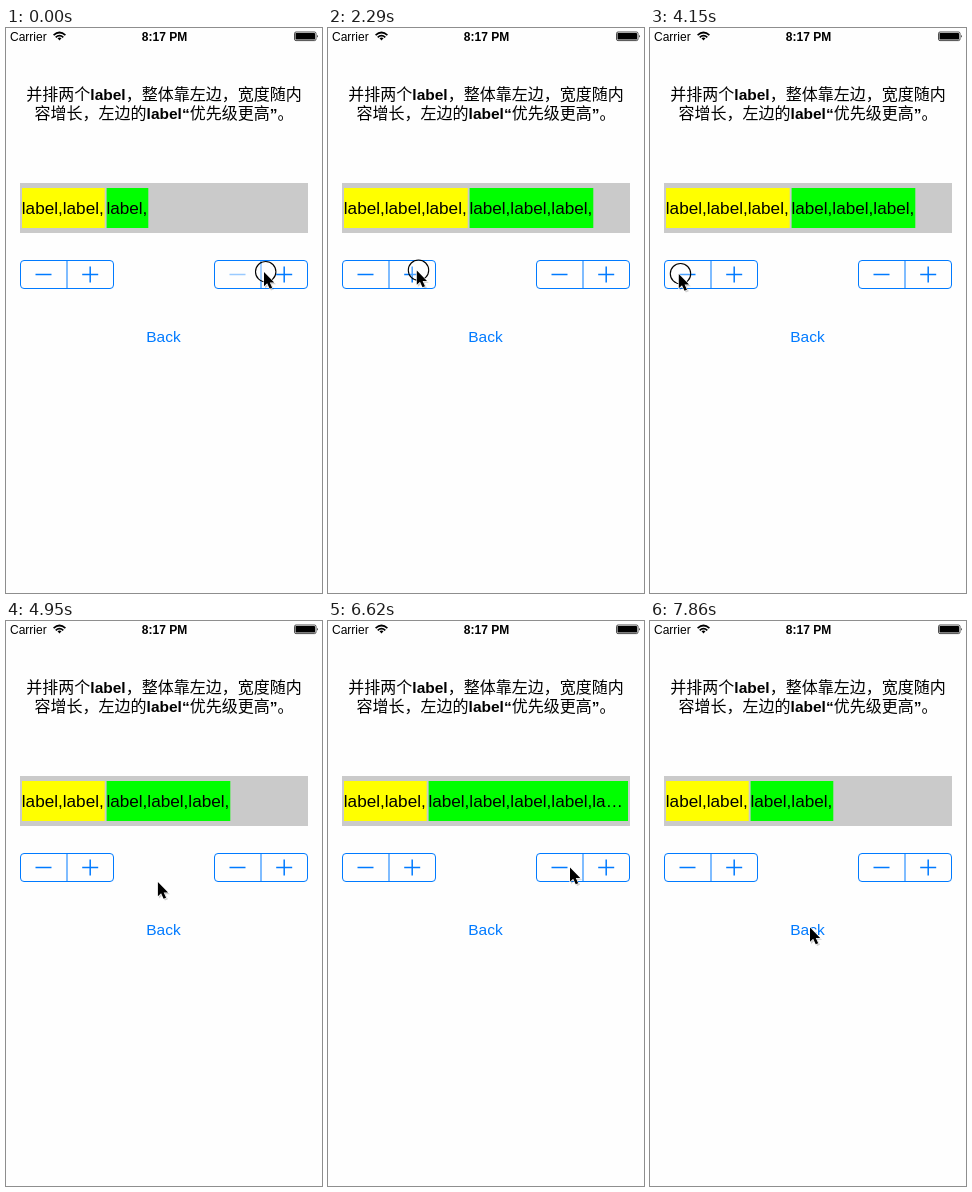
These frames come from a looping animation (316x565 px, 8000 ms). An HTML page:

```html
<!DOCTYPE html>
<html lang="zh">
<head>
<meta charset="utf-8">
<title>Two labels</title>
<style>
  html, body { margin: 0; width: 100%; height: 100%; overflow: hidden; background: #fefefe; }
  svg { display: block; width: 100vw; height: 100vh; }
  text { font-family: "Liberation Sans", Arial, sans-serif; white-space: pre; }
  .title { font: 500 16px "Noto Sans CJK SC", "Noto Sans CJK", sans-serif; text-anchor: middle; }
  .title tspan { font: bold 15.5px "Liberation Sans", Arial, sans-serif; }
  .status { font-size: 12px; }
  .label { font-size: 17.15px; }
  .line { fill: none; stroke: #007aff; }
</style>
</head>
<body>
<svg viewBox="0 0 316 565">
  <rect width="316" height="565" fill="#fefefe"/>

  <text class="status" x="4" y="12.5">Carrier</text>
  <g fill="none" stroke="#000" stroke-width="1.7">
    <path d="M47.6 7.2Q53.5 1.8 59.4 7.2M49.7 9.3Q53.5 5.8 57.3 9.3"/>
    <path d="M51.5 10.3Q53.5 8.6 55.5 10.3L53.5 12.6Z" fill="#000" stroke="none"/>
  </g>
  <text class="status" x="158.5" y="12.5" font-weight="bold" text-anchor="middle">8:17 PM</text>
  <rect x="288.5" y="4" width="21.5" height="8.6" rx="1.5" fill="none" stroke="#000" stroke-width=".7"/>
  <rect x="289.5" y="5" width="19.5" height="6.6" rx=".6"/>
  <path d="M311 6.8q1.6 1.5 0 3z"/>

  <text class="title" x="158" y="72">并排两个<tspan>label</tspan>，整体靠左边，宽度随内</text>
  <text class="title" x="158" y="91">容增长，左边的<tspan>label“</tspan>优先级更高<tspan>”</tspan>。</text>

  <rect x="14" y="155" width="288" height="50" fill="#cacaca"/>
  <rect id="leftBox" x="16" y="160" height="40" fill="#ff0"/>
  <text id="leftText" class="label" x="15.8" y="186"></text>
  <rect id="rightBox" y="160" height="40" fill="#0f0"/>
  <text id="rightText" class="label" y="186"></text>

  <g id="steppers"></g>
  <text x="157.5" y="314" font-size="15.5" fill="#007aff" text-anchor="middle">Back</text>

  <circle id="ring" r="10.2" fill="#fff" fill-opacity=".3" stroke="#000" stroke-width="1.1"/>
  <g id="cursor">
    <path d="M1 2V16.5L4.5 13.5L7 18.5L10 17.2L7.6 12.3H12Z" fill="#000" opacity=".18"/>
    <path d="M0 0V14.2L3.2 11.3L5.7 16.8L8.2 15.7L5.8 10.4H10.2Z" stroke="#fff" stroke-width="1.1" paint-order="stroke"/>
  </g>
</svg>
<script>
const LOOP = 8000, UNIT = 41, DOTS = 30, RIGHT_EDGE = 300;
const $ = id => document.getElementById(id);
const set = (el, attrs) => { for (const k in attrs) el.setAttribute(k, attrs[k]); };

// Each press: start, side, change, then optional highlight, delay of the change, hold time
const press = (at, side, change, lit = false, lag = 0, hold = 80) => ({ at, side, change, lit, lag, hold });
const presses = [
  press(0, "R", 1, false, 90, 170), press(1400, "R", 1),
  press(2290, "L", 1), press(2470, "L", 1), press(2740, "L", 1), press(3000, "L", 1, true),
  press(3710, "L", -1), press(3980, "L", -1), press(4150, "L", -1), press(4510, "L", -1, true),
  press(5300, "R", 1), press(5480, "R", 1), press(5750, "R", 1, true), press(5920, "R", 1),
  press(6450, "R", -1), press(6630, "R", -1), press(6800, "R", -1), press(6980, "R", -1, true),
  press(7230, "R", -1, true, 90)
];

// The pointer travels in discrete steps from the first to the last time
const home = [258, 244];
const moves = [
  { from: 620, to: 700, steps: 2, end: [79, 242.5], bend: 0 },
  { from: 880, to: 1220, steps: 5, end: [267.5, 244], bend: 0 },
  { from: 1670, to: 2020, steps: 5, end: [88.8, 242.5], bend: -15 },
  { from: 3270, to: 3530, steps: 4, end: [28.8, 246], bend: 0 },
  { from: 4690, to: 5130, steps: 6, end: [275, 256], bend: 10 },
  { from: 6100, to: 6190, steps: 2, end: [242, 246.5], bend: 0 },
  { from: 7410, to: 7860, steps: 6, end: [160, 306.5], bend: 0 }
];

const stepper = (side, x) => `<g transform="translate(${x} 232)">
  <rect id="${side}minus" x="1" y="1" width="46" height="28" rx="3" fill="#007aff" opacity="0"/>
  <rect id="${side}plus" x="47" y="1" width="46" height="28" rx="3" fill="#007aff" opacity="0"/>
  <rect class="line" x=".5" y=".5" width="93" height="28" rx="3.5"/>
  <path class="line" d="M47 .5V28.5"/>
  <path id="${side}minusSign" class="line" stroke-width="1.5" d="M15.5 14.5h16"/>
  <path class="line" stroke-width="1.5" d="M62.2 14.5h16M70.2 6.5v16"/>
</g>`;
$("steppers").innerHTML = stepper("L", 14) + stepper("R", 208);

const ease = u => u * u * (3 - 2 * u);

function pointerAt(t) {
  let pos = home;
  for (const { from, to, steps, end, bend } of moves) {
    if (t < from) break;
    const step = Math.floor((t - from) / (to - from) * (steps - 1) + 1e-6) + 1;
    const u = ease(Math.min(step / steps, 1));
    pos = [
      pos[0] + (end[0] - pos[0]) * u,
      pos[1] + (end[1] - pos[1]) * u + bend * Math.sin(Math.PI * u)
    ];
  }
  return pos;
}

function fit(count, room) {
  const full = count * UNIT + 0.7;
  if (full <= room) return { text: "label,".repeat(count), width: full };
  const whole = Math.floor((room - DOTS) / UNIT);
  return { text: "label,".repeat(whole) + "la…", width: room };
}

function render(t) {
  const count = { L: 2, R: 1 };
  const lit = {};
  let down = false;
  for (const p of presses) {
    if (t >= p.at + p.lag) count[p.side] += p.change;
    if (t >= p.at && t < p.at + p.hold) {
      down = true;
      if (p.lit) lit[p.side + (p.change > 0 ? "plus" : "minus")] = true;
    }
  }

  const left = fit(count.L, RIGHT_EDGE - 16);
  const x = 16 + left.width + 1.9;
  const right = fit(count.R, RIGHT_EDGE - x);
  set($("leftBox"), { width: left.width });
  set($("rightBox"), { x, width: right.width });
  set($("rightText"), { x: x - 0.2 });
  $("leftText").textContent = left.text;
  $("rightText").textContent = right.text;

  for (const side of ["L", "R"]) {
    for (const part of ["minus", "plus"]) set($(side + part), { opacity: lit[side + part] ? 0.15 : 0 });
    set($(side + "minusSign"), { opacity: count[side] > 1 ? 1 : 0.4 });
  }

  const [px, py] = pointerAt(t);
  set($("cursor"), { transform: `translate(${px} ${py})` });
  set($("ring"), { cx: px + 1.7, cy: py - 0.3, visibility: down ? "visible" : "hidden" });
}

const start = performance.now();
function tick() {
  render((performance.now() - start) % LOOP);
  requestAnimationFrame(tick);
}
tick();
</script>
</body>
</html>
```
